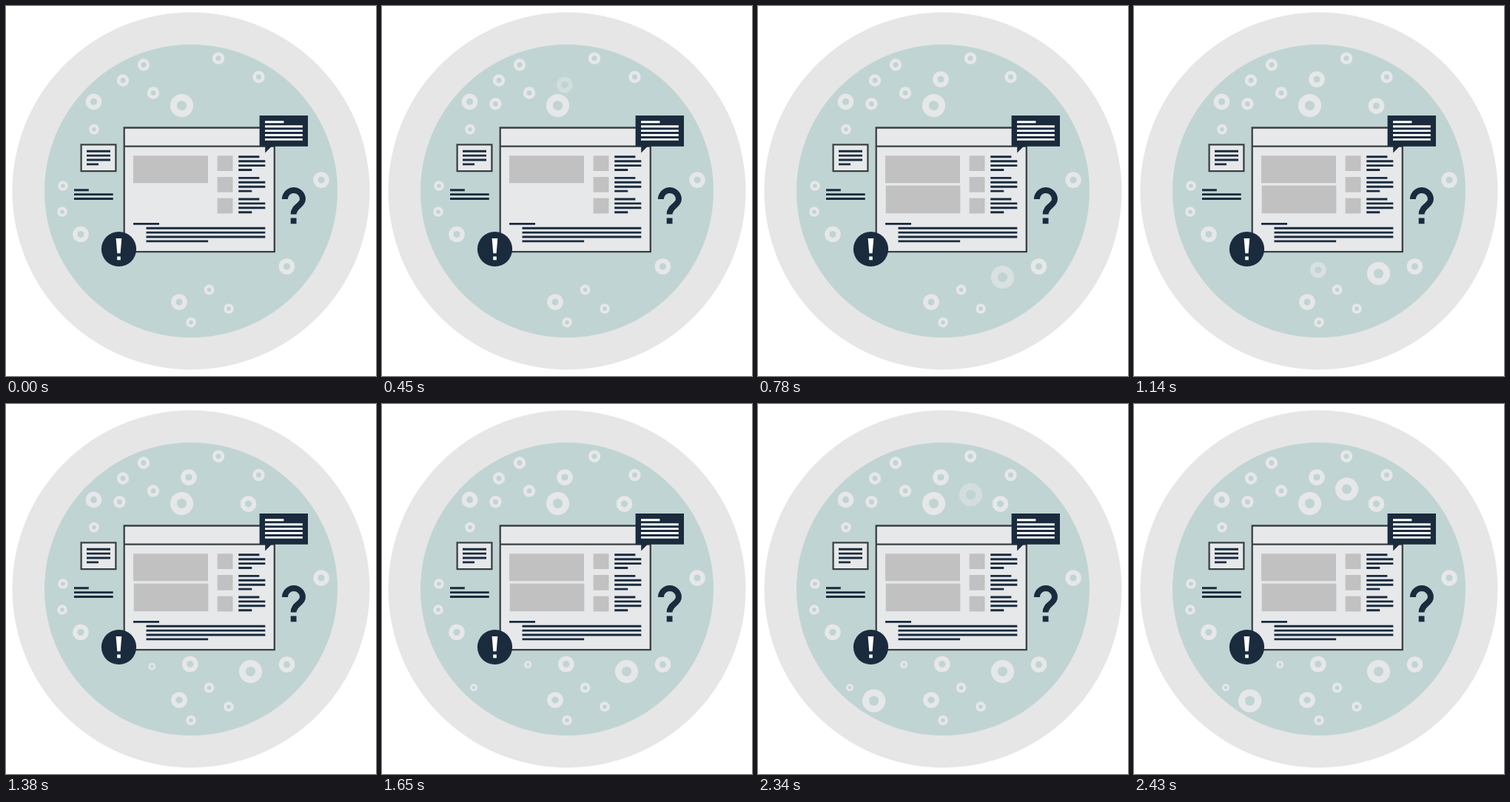
Write an HTML page that moves like this. It is 500 by 500 pixels and loops after 3600 ms.

```html
<!DOCTYPE html>
<html lang="en">
<head>
<meta charset="utf-8">
<style>
html, body { margin: 0; width: 100%; height: 100%; overflow: hidden; background: #fff; }
svg { display: block; width: 100vw; height: 100vh; }
</style>
</head>
<body>
<svg viewBox="0 0 500 500">
  <circle cx="250" cy="250" r="241.5" fill="#e6e6e6"/>
  <circle cx="250" cy="250" r="198" fill="#c0d4d3"/>
  <g id="rings" fill="none" stroke="#e6e7e8"></g>
  <g fill="#e6e8ea" stroke="#3b4043" stroke-width="2.3">
    <path d="M159.7 164.5H362.8V332.2H159.7ZM159.7 189.7H362.8"/>
    <path d="M101.6 187.3H148.4V223.2H101.6Z"/>
  </g>
  <g id="images" fill="#c1c1c1"></g>
  <g fill="#1a2b3e">
    <path d="M342.6 148H408V189.8H358.8L350.2 198.4V189.8H342.6Z"/>
    <circle cx="152.5" cy="328.5" r="23.6"/>
    <path d="M384.7 286.5H392.5V294.3H384.7Z"/>
  </g>
  <path fill="none" stroke="#1a2b3e" stroke-width="8" d="M376.9 261A12 12 0 0 1 400.9 261C400.9 270 388.6 270 388.6 281.6"/>
  <path fill="#fff" d="M148.6 314H156.3L154.6 334.3H150.3ZM150.2 338.5H154.8V343.2H150.2Z"/>
  <g id="text" stroke-width="2.9"></g>
</svg>
<script>
const LOOP = 3600, STEP = 30, FADE = 120, RISE = 10, LINE_GAP = 5.9;
const TINY = 5, SMALL = 6.8, MEDIUM = 8.2, LARGE = 10.8, HUGE = 15.6;
const $ = id => document.getElementById(id);

function add(parent, tag, attrs) {
  const el = document.createElementNS('http://www.w3.org/2000/svg', tag);
  for (const k in attrs) el.setAttribute(k, attrs[k]);
  return $(parent).appendChild(el);
}

const ring = (r, cx, cy) =>
  add('rings', 'circle', { cx, cy, r: r * 0.71, 'stroke-width': r * 0.58 });

const image = (x, y, width, height) => add('images', 'rect', { x, y, width, height });

// Full-width rows; the first and last may cover only a share of the width.
function paragraph(x, y, width, rows, first = 1, last = 1, stroke = '#1a2b3e') {
  let d = '';
  for (let i = 0; i < rows; i++) {
    const share = i === 0 ? first : i === rows - 1 ? last : 1;
    d += `M${x} ${y + i * LINE_GAP}h${width * share}`;
  }
  add('text', 'path', { d, stroke });
}

const scatter = (r, ...points) => points.forEach(p => ring(r, ...p));
scatter(SMALL, [119, 166.6], [77, 243], [76, 278], [274.6, 383.4], [301, 409], [250, 427.5]);
scatter(MEDIUM, [186, 79.5], [158, 100.5], [199, 117.5], [287, 70.6], [341.5, 96]);
scatter(LARGE, [118.5, 129.4], [426, 235], [379.5, 352], [101, 308.5], [234, 400]);
ring(HUGE, 237.5, 134.5);

image(172, 202.3, 101, 37);
for (let i = 0; i < 3; i++) {
  image(285.6, 202.3 + i * 28.7, 20.9, 20.7);
  paragraph(314.2, 203.8 + i * 28.6, 36.1, 4, 0.78, 0.5);
}
paragraph(172, 294.4, 35, 1);
paragraph(189.5, 300.2, 160.8, 4, 1, 0.52);
paragraph(109, 196.2, 32, 4, 1, 0.5);
paragraph(92, 248.7, 52.7, 3, 0.376);
paragraph(350, 156.8, 50.8, 5, 0.5, 1, '#fff');

const arrivals = [];
const arrive = (start, el) => arrivals.push({ start, el });
arrive(60, ring(MEDIUM, 153.4, 132.2));
arrive(420, ring(LARGE, 247, 99));
arrive(570, image(172.7, 242.6, 100.6, 37.6));
arrive(720, ring(HUGE, 330.5, 361.5));
arrive(960, ring(LARGE, 327.5, 135));
arrive(1080, ring(LARGE, 248.8, 351.5));
arrive(1290, ring(TINY, 197.2, 352.2));
arrive(1530, ring(TINY, 124, 383.2));
arrive(1770, ring(HUGE, 156.6, 401));
arrive(2310, ring(HUGE, 287.5, 115));

function draw(now) {
  const t = Math.floor(now % LOOP / STEP) * STEP;
  for (const { start, el } of arrivals) {
    const p = Math.min(1, Math.max(0, (t - start) / FADE));
    el.setAttribute('opacity', p && 0.3 + 0.7 * p);
    el.setAttribute('transform', `translate(0 ${RISE * (1 - p)})`);
  }
}

function tick() {
  draw(performance.now());
  requestAnimationFrame(tick);
}
tick();
</script>
</body>
</html>
```
